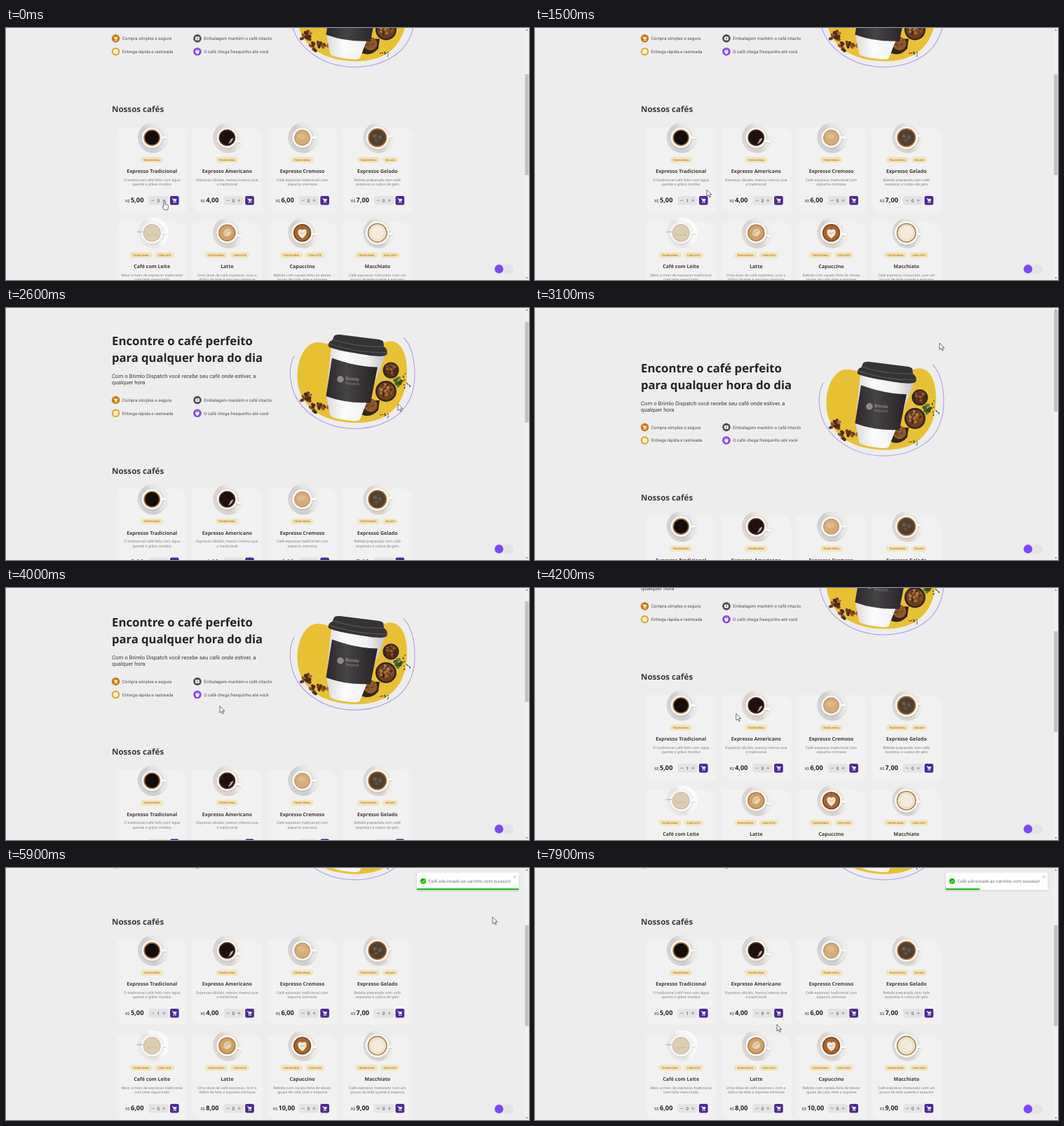
These frames come from a looping animation (746 px wide and 360 px high, 8000 ms). An HTML page:

```html
<!DOCTYPE html>
<html lang="pt-BR">
<head>
<meta charset="utf-8">
<title>Nossos cafés</title>
<style>
html, body { margin: 0; width: 100%; height: 100%; overflow: hidden; background: #ededed; }
svg { display: block; width: 746px; height: 360px; font-family: Roboto, sans-serif; text-rendering: geometricPrecision; }
.head { font-family: "Noto Sans", sans-serif; font-weight: 700; fill: #403937; }
.mid { text-anchor: middle; }
.tag { font-size: 3.7px; font-weight: 700; fill: #c47f17; text-anchor: middle; }
.desc { font-size: 5.44px; fill: #8d8686; text-anchor: middle; }
.item { font-size: 6.22px; fill: #574f4d; }
</style>
</head>
<body>
<svg viewBox="0 0 746 360" xmlns="http://www.w3.org/2000/svg">
  <defs>
    <linearGradient id="dish" x1="0" y1=".75" x2="1" y2=".25">
      <stop offset="0" stop-color="#fff" stop-opacity=".15"/>
      <stop offset=".25" stop-color="#000" stop-opacity=".05"/>
      <stop offset=".6" stop-color="#fff" stop-opacity=".2"/>
      <stop offset="1" stop-color="#fff" stop-opacity=".6"/>
    </linearGradient>
    <linearGradient id="paper">
      <stop offset="0" stop-color="#dcdada"/>
      <stop offset=".3" stop-color="#fbfbfb"/>
      <stop offset=".7" stop-color="#f1f0f0"/>
      <stop offset="1" stop-color="#c4c1c0"/>
    </linearGradient>
    <linearGradient id="dark">
      <stop offset="0" stop-color="#2b292b"/>
      <stop offset=".4" stop-color="#454345"/>
      <stop offset="1" stop-color="#252325"/>
    </linearGradient>
    <filter id="soft" x="-10%" y="-40%" width="120%" height="200%">
      <feDropShadow dx="0" dy=".6" stdDeviation="1.6" flood-opacity=".18"/>
    </filter>
    <path id="cart" d="M-3.2-2.7H-2.1L-.9 1H2.2L3.1-1.7H-1.6ZM-.9 2.3a.6.6 0 1 0 .1 0M1.8 2.3a.6.6 0 1 0 .1 0" stroke-width=".7"/>
  </defs>
  <rect width="746" height="360" fill="#ededed"/>
  <g id="page"></g>
  <g id="toast" filter="url(#soft)">
    <rect x="586" y="6.5" width="145.3" height="24.8" rx="1.5" fill="#fff"/>
    <circle cx="595" cy="18.8" r="4" fill="#07bc0c"/>
    <path d="M593 18.9l1.5 1.5 2.6-3" fill="none" stroke="#fff" stroke-width="1"/>
    <text x="602.8" y="21" font-size="6.2" fill="#757575">Café adicionado ao carrinho com sucesso!</text>
    <path d="M723.8 10.9l3.4 3.4m0-3.4l-3.4 3.4" stroke="#a5a5a5" stroke-width=".8"/>
    <rect id="bar" x="586" y="29.2" height="2.1" fill="#07bc0c"/>
  </g>
  <rect x="697" y="337.7" width="27" height="13.4" rx="6.7" fill="#e4e3e3"/>
  <circle cx="703.2" cy="344.3" r="6.2" fill="#8047f8"/>
  <rect x="739.6" width="6.4" height="360" fill="#f1f1f1"/>
  <path d="M741.4 3.4l1.5-1.7 1.5 1.7zM741.4 356.2l1.5 1.7 1.5-1.7z" fill="#505050"/>
  <rect id="thumb" x="740.3" width="5.2" height="144" fill="#c1c1c1"/>
  <g id="cursor" fill="#fff" stroke="#333" stroke-width=".7" stroke-linejoin="round">
    <path id="arrow" d="M0 0V9.6L2.3 7.5L3.9 11L5.4 10.3L3.9 6.9H7Z"/>
    <path id="hand" d="M-1 7.5V.9a1 1 0 0 1 2 0V5l3.4.8Q5.6 6.2 5.5 7.5L4.8 12.8H-.2L-2.9 8.6Q-3 7-1 8.2Z"/>
  </g>
</svg>
<script>
const $ = id => document.getElementById(id);
const LOOP = 8000, STEP = 100;

let seed = 7;
const rnd = () => (seed = (seed * 16807) % 2147483647) / 2147483647;
const pick = list => list[Math.floor(rnd() * list.length)];

const circle = (x, y, r, fill, more = '') =>
  `<circle cx="${x}" cy="${y}" r="${r}" fill="${fill}" ${more}/>`;
const rect = (x, y, w, h, r, fill) =>
  `<rect x="${x}" y="${y}" width="${w}" height="${h}" rx="${r}" fill="${fill}"/>`;
const text = (x, y, cls, size, str, more = '') =>
  `<text x="${x}" y="${y}" class="${cls}" ${size ? `font-size="${size}"` : ''} ${more}>${str}</text>`;
const cart = (x, y, k) =>
  `<use href="#cart" transform="translate(${x} ${y}) scale(${k})" fill="#fff" stroke="#fff"/>`;

// Ellipses scattered over a disc
function scatter(n, cx, cy, rx, ry, size, colors) {
  let out = '';
  for (let i = 0; i < n; i++) {
    const a = rnd() * 6.283, d = Math.sqrt(rnd());
    const x = (cx + Math.cos(a) * d * rx).toFixed(1), y = (cy + Math.sin(a) * d * ry).toFixed(1);
    out += `<ellipse cx="${x}" cy="${y}" rx="${size}" ry="${size * .66}" fill="${pick(colors)}"
      transform="rotate(${Math.floor(rnd() * 180)} ${x} ${y})"/>`;
  }
  return out;
}

const BEANS = ['#6b3b1a', '#8a5427', '#4d2812', '#a56c36'];
const CRUMBS = ['#2b2019', '#46301f'];

function heroArt() {
  return `
  <path d="M415.500 100C415.500 74 427 51 445 51C464 51 480 66 505 66C525 66 532 49.500 548 49.500C565 49.500 572 70 572 92C572 132 553 166 500 166C448 166 415.500 140 415.500 100Z" fill="#e8c034"/>
  <path d="M411 70C404 84 404 102 409 118.500C414 134 424 147 440 157.500C457 169 478 174.300 498 174.300C519 174.300 538 169 555 157.500C573 145 583 124 583 98C583 72 577 54 567 44" fill="none" stroke="#b39bf0" stroke-width="1.1"/>
  ${scatter(18, 448, 146, 20, 7, 3.3, BEANS)}${scatter(10, 428, 132, 8, 9, 3.3, BEANS)}
  ${scatter(8, 557, 105, 7, 8, 3.6, ['#48642c', '#5f7d37', '#36511f'])}
  ${circle(549, 91, 11.5, '#2e2420')}${circle(549, 91, 9.5, '#4a2a18')}
  ${scatter(24, 549, 91, 8, 8, 2.1, BEANS)}
  ${circle(542, 121, 15, '#33241c')}${circle(542, 121, 12.5, '#6b401f')}
  ${scatter(34, 542, 121, 10.5, 10.5, 2.2, [...BEANS, '#b3824f'])}
  <path d="M512 134L533 134L531 148Q520 160 507 154Z" fill="#33231a"/>
  ${circle(520, 141, 9.5, '#8a5a2c')}${scatter(28, 520, 141, 8, 8, 1.2, BEANS)}
  ${scatter(14, 571, 107, 7, 13, 1, CRUMBS)}${scatter(9, 541, 157, 8, 5, 1, CRUMBS)}
  <path d="M464 57L541 70L505 161Q503 165 484 162Q462 159 462 154L457 128Z" fill="url(#paper)"/>
  <path d="M465 73.500Q499 86 530 86.500L520 137Q486 139 456.500 128Z" fill="url(#dark)"/>
  <path d="M468 42Q470 39.500 476 40L532 47Q539 48.500 538.500 52L539 57Q545 61 543.500 68Q540 73 517 69.500Q467 62 460 57Q459 50 465.500 48Z" fill="#353335"/>
  <path d="M461 53Q498 66 543 66M466 47Q500 58 539 57" fill="none" stroke="#565355" stroke-width="1.3"/>
  <g transform="rotate(5 480 104)" fill="#8f8a8b">
    ${circle(477, 104, 4.8, '#8f8a8b')}
    ${text(484, 104.5, '', 6.6, 'Brimlo', 'font-weight="700"')}
    ${text(484, 110.5, '', 5.2, 'Dispatch')}
  </g>`;
}

function hero() {
  const items = [
    [156.5, 133.5, '#c47f17', 'Compra simples e segura'],
    [273, 133.5, '#574f4d', 'Embalagem mantém o café intacto'],
    [156.5, 152.3, '#dbac2c', 'Entrega rápida e rastreada'],
    [273, 152.3, '#8047f8', 'O café chega fresquinho até você']
  ];
  const icons = [
    cart(156.3, 133.5, .85),
    rect(270.2, 131.2, 5.6, 4.8, .8, '#fff') + rect(272.2, 132.6, 1.6, 2, .3, '#574f4d'),
    circle(156.5, 152.3, 3.6, '#f4efdf'),
    '<path d="M270.400 151h5.200l-.8 3.200q-.3 1.200-1.800 1.200t-1.800-1.200zM271.500 150.300v-1.500m1.500 1.500v-1.500m1.500 1.500v-1.500" fill="#fff" stroke="#fff" stroke-width=".6"/>'
  ];
  return text(151, 54.8, 'head', 16.8, 'Encontre o café perfeito', 'style="fill:#272221"')
    + text(151, 79, 'head', 16.6, 'para qualquer hora do dia', 'style="fill:#272221"')
    + text(151, 101.7, '', 7.77, 'Com o Brimlo Dispatch você recebe seu café onde estiver, a', 'fill="#403937"')
    + text(151, 110.8, '', 7.77, 'qualquer hora', 'fill="#403937"')
    + items.map(([x, y, c, s], i) =>
        circle(x, y, 5.8, c) + icons[i] + text(x + 9.3, y + 2.3, 'item', 0, s)).join('')
    + heroArt();
}

// Cup seen from above
function cup(x, y, { dish, ring, fill, r, turn = 0, art = '' }) {
  return circle(x + 1.6, y, 22, dish) + circle(x + 1.6, y, 22, 'url(#dish)')
    + circle(x + 1, y + .6, r + 4.2, '#000', 'opacity=".06"')
    + `<g transform="translate(${x} ${y}) rotate(${turn})">
        ${rect(11, -1.7, 10, 3.4, 1.7, '#fbfaf9')}
        <path d="M14 2.100H20.500" stroke="#b9b2ab" stroke-width=".6"/></g>`
    + circle(x, y, r + 2.8, '#f8f7f6')
    + circle(x, y, r, ring) + circle(x, y, r - 1.6, fill)
    + `<g transform="translate(${x} ${y})">${art}</g>`;
}

const GREY = '#dcdcdc', CREAM = '#e6e0da';
const T = 'TRADICIONAL', L = 'COM LEITE', G = 'GELADO';
const TAG_W = { [T]: 32.6, [L]: 27.4, [G]: 22 };

const coffees = [
  ['Expresso Tradicional', 'O tradicional café feito com água', 'quente e grãos moídos', '5,00', [T],
    { dish: GREY, ring: '#a0713f', fill: '#140d0a', r: 11.8 }],
  ['Expresso Americano', 'Expresso diluído, menos intenso que', 'o tradicional', '4,00', [T],
    { dish: CREAM, ring: '#4a2a22', fill: '#1f0f0e', r: 11.8, turn: 18,
      art: '<path d="M1 9Q8 7 9 0L5 2Q4 6 1 9Z" fill="#b5a9a3"/>' }],
  ['Expresso Cremoso', 'Café expresso tradicional com', 'espuma cremosa', '6,00', [T],
    { dish: GREY, ring: '#c59a68', fill: '#d6ac78', r: 11.4,
      art: '<ellipse cx="-1" cy="-2" rx="6" ry="4" fill="#dfbb8b"/>' }],
  ['Expresso Gelado', 'Bebida preparada com café', 'expresso e cubos de gelo', '7,00', [T, G],
    { dish: CREAM, ring: '#a86f38', fill: '#54402f', r: 13.4, turn: -6,
      art: rect(-6, -5, 5, 5, 1, '#6a5b4d') + rect(1, -3, 5, 5, 1, '#64564a') + rect(-4, 2, 5, 4, 1, '#5f5145') }],
  ['Café com Leite', 'Meio a meio de expresso tradicional', 'com leite vaporizado', '6,00', [T, L],
    { dish: '#f6f5f5', ring: '#d2c1a4', fill: '#dccdb3', r: 12.6,
      art: '<path d="M-21.500-1.500H-13" stroke="#b5b0ab" stroke-width="1.100"/><path d="M-8 3H8" stroke="#cdbb9c" stroke-width="1"/>' }],
  ['Latte', 'Uma dose de café expresso, com o', 'dobro de leite e espuma cremosa', '8,00', [T, L],
    { dish: CREAM, ring: '#b27b43', fill: '#cfa169', r: 12.2, turn: 14,
      art: '<path d="M-5 3Q-6-6 3-6Q8-2 4 3Q0 7-5 3Z" fill="#e9d3ae"/><path d="M-3 2Q-2-4 4-3" fill="none" stroke="#c3935a"/>' }],
  ['Capuccino', 'Bebida com canela feita de doses', 'iguais de café, leite e espuma', '10,00', [T, L],
    { dish: CREAM, ring: '#7e421a', fill: '#a7652f', r: 12.6, turn: 6,
      art: '<path d="M0 8Q-7 3-6-3Q-4-7 0-4Q4-7 6-3Q7 3 0 8Z" fill="#f5ead9"/><path d="M-3-1Q0 3 3-1" fill="none" stroke="#c08a55" stroke-width=".8"/>' }],
  ['Macchiato', 'Café expresso misturado com um', 'pouco de leite quente e espuma', '9,00', [T, L],
    { dish: '#e3e0dc', ring: '#a9824f', fill: '#ece1cb', r: 14, turn: 5,
      art: '<circle r="9" fill="#f4ecdb"/>' }]
];

function tags(list, cx, y) {
  const gap = 3.7;
  let x = cx - (list.reduce((sum, s) => sum + TAG_W[s], 0) + gap * (list.length - 1)) / 2;
  return list.map(s => {
    const w = TAG_W[s];
    const out = rect(x, y - 4.2, w, 8.4, 4.2, '#f1e5bf') + text(x + w / 2, y + 1.35, 'tag', 0, s);
    x += w + gap;
    return out;
  }).join('');
}

function card([name, line1, line2, price, labels, look], i) {
  const x = 158.2 + (i % 4) * 107.2, y = 103 + Math.floor(i / 4) * 136, mid = x + 50;
  const end = x + (price.length > 4 ? 39.6 : 38.2);
  return `<path d="M${x + 2.3} ${y}h83.700a14 14 0 0 1 14 14v104.200a2.300 2.300 0 0 1-2.300 2.300h-83.700a14 14 0 0 1-14-14V${y + 2.3}a2.300 2.300 0 0 1 2.300-2.300z" fill="#f2f1f1"/>`
    + cup(mid, y + 14.8, look)
    + tags(labels, mid, y + 46.4)
    + text(mid, y + 65.4, 'head mid', 7.05, name)
    + text(mid, y + 76.8, 'desc', 0, line1) + text(mid, y + 83.4, 'desc', 0, line2)
    + `<text x="${end}" y="${y + 107.4}" text-anchor="end" font-size="5.44" fill="#403937">R$ <tspan class="head" font-size="9.2" style="fill:#272221">${price}</tspan></text>`
    + rect(x + 45.3, y + 98, 27.8, 12.8, 2.3, '#e4e3e3')
    + `<path d="M${x + 49} ${y + 104.4}h4.400M${x + 64.8} ${y + 104.4}h4.400m-2.200-2.200v4.400" stroke="#9a7ad8" stroke-width=".8"/>`
    + text(x + 59, y + 106.7, 'mid', 6.22, '0', `fill="#403937" id="qty${i}"`)
    + rect(x + 75.8, y + 98, 12.6, 12.8, 2.3, '#4b2995') + cart(x + 82, y + 104.3, .95);
}

$('page').innerHTML = hero()
  + `<g transform="translate(0 157.500)">${text(151, 81, 'head', 11.6, 'Nossos cafés')}${coffees.map(card).join('')}</g>`;

const clamp = v => Math.max(0, Math.min(1, v));
const part = (t, a, b) => clamp((t - a) / (b - a));
const smooth = p => p * p * (3 - 2 * p);
const easeOut = p => 1 - (1 - p) ** 2.8;

function along(keys, t, ease = smooth) {
  let i = 1;
  while (i < keys.length - 1 && t > keys[i][0]) i++;
  const a = keys[i - 1], b = keys[i], p = ease(part(t, a[0], b[0]));
  return a.slice(1).map((v, k) => v + (b[k + 1] - v) * p);
}

const moves = [
  [0, 226, 247], [650, 226, 247], [1300, 245, 231], [1650, 245, 231], [2550, 559, 137],
  [2700, 559, 137], [3100, 577, 50], [3400, 577, 50], [4000, 305, 168.7], [4500, 253.5, 199.5],
  [5000, 243, 207], [5400, 243, 207], [5750, 694, 70], [5900, 694, 70],
  [6700, 570, 168], [7600, 407, 237], [7900, 345, 223.5]
];

// Scroll distance from the top, in notches of the mouse wheel
const NOTCH = 38.86, PAGE_TOP = 36.86;
const wheel = [[1900, 4], [2580, 1], [2700, 1], [2950, 0], [3857, 0], [4370, 5]];

// Offsets of the toast: flies in and bounces to rest
const slide = [[5190, 1165], [5610, -9.7], [5715, 3.9], [5820, -1.9], [5890, 0]];

function draw(t) {
  const s = along(wheel, t)[0] * NOTCH;
  $('page').setAttribute('transform', `translate(0 ${PAGE_TOP - s})`);
  $('thumb').setAttribute('y', 4 + .4 * s);
  $('qty0').textContent = t < 300 ? 0 : 1;

  const [x, y] = along(moves, t);
  const hand = t < 700 || (t >= 4900 && t < 5450);
  $('cursor').setAttribute('transform', `translate(${x} ${y})`);
  $('hand').style.display = hand ? '' : 'none';
  $('arrow').style.display = hand ? 'none' : '';

  $('toast').style.display = t < 5450 ? 'none' : '';
  $('toast').setAttribute('transform', `translate(${along(slide, t, easeOut)[0]} 0)`);
  $('toast').setAttribute('opacity', part(t, 5190, 5610));
  $('bar').setAttribute('width', 145.3 * (1 - part(t, 5900, 8900)));
}

const start = performance.now();
function tick() {
  const t = (performance.now() - start) % LOOP;
  draw(Math.floor(t / STEP) * STEP);
  requestAnimationFrame(tick);
}
tick();
</script>
</body>
</html>
```
